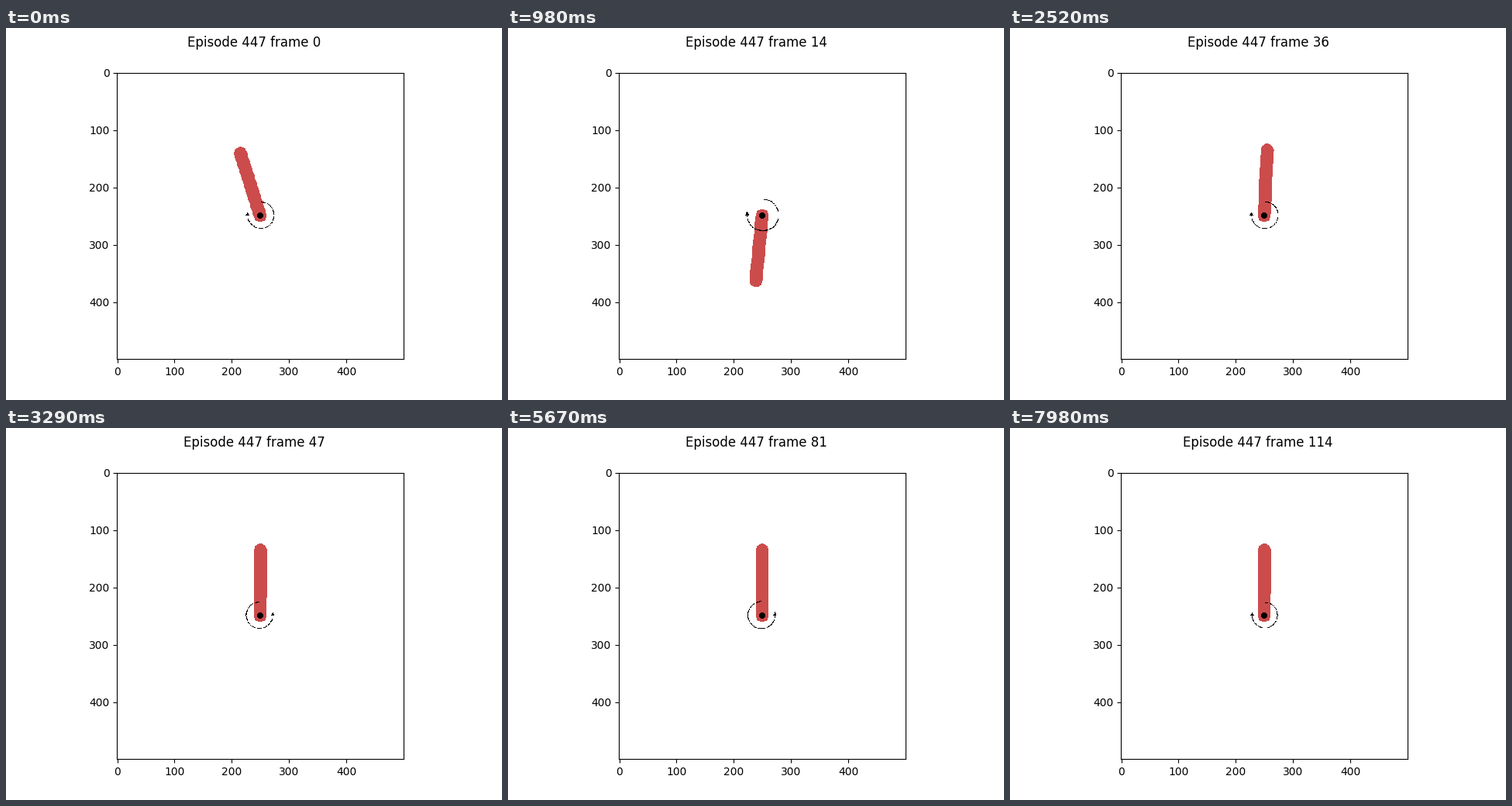
A matplotlib script for the animation above (8 s loop, 640 px wide and 480 px high).

```python
import numpy as np
import matplotlib.pyplot as plt
from matplotlib.animation import FuncAnimation

plt.rcParams["font.family"] = "DejaVu Sans"

LOOP_MS, TICK_MS, STEP_MS = 8000, 20, 70
SIZE = 500
UNIT = SIZE / 4.4                 # pixels per metre in the simulated view
ROD_LENGTH, ROD_RADIUS, AXLE_RADIUS = UNIT, 0.1 * UNIT, 0.05 * UNIT
SCREEN_SCALE = 0.74               # screen pixels per view pixel
RED, BLACK = (204, 76, 76, 255), (0, 0, 0, 255)
SETTLED = 26                      # step at which the balancing chatter begins

# Phase along the pendulum's separatrix, nearly linear in time.
PHASE_STEPS = [0, 6, 12, 14, 26, 47, 114]
PHASE = [-2.565, -1.585, -0.460, -0.048, 2.359, 6.96, 20]

# Radius of the torque arrow on screen; positive is counter-clockwise.
SWING_STEPS = [0, 5, 10, 14, 22, 26]
SWING_TORQUE = [-17, 15, 15, -20.3, -14, 0]
HOLD_STEPS = [27, 47, 66, 70, 93, 97, 114]
HOLD_TORQUE = [17.3, 17, 14.5, 17.3, 17.5, 15.7, 16.3]

rows, cols = np.mgrid[:SIZE, :SIZE]
dx = cols + 0.5 - SIZE / 2
dy = rows + 0.5 - SIZE / 2
axle = np.hypot(dx, dy) <= AXLE_RADIUS


def rod_angle(step):
    """Angle from straight down, positive to the right."""
    angle = 2 * np.arctan(np.sinh(np.interp(step, PHASE_STEPS, PHASE)))
    if step > SETTLED:
        angle -= 0.0006 if step % 2 else 0.0036
    return angle


def torque_radius(step):
    if step <= SETTLED:
        return np.interp(step, SWING_STEPS, SWING_TORQUE)
    sign = 1 if step % 2 else -1
    return sign * np.interp(step, HOLD_STEPS, HOLD_TORQUE)


def rod_mask(angle):
    along = dx * np.sin(angle) + dy * np.cos(angle)
    across = dx * np.cos(angle) - dy * np.sin(angle)
    beyond = along - np.clip(along, 0, ROD_LENGTH)
    return np.hypot(across, beyond) <= ROD_RADIUS


def arrow_mask(torque):
    """Three quarters of a circle from the top, ending in an arrowhead."""
    radius = abs(torque) / SCREEN_SCALE
    x = -np.sign(torque) * dx / radius - 0.05
    y = dy / radius + 0.03
    arc = (np.abs(np.hypot(x, y) - 1) <= 0.025) & ((x >= 0) | (y >= 0))
    head = (y <= 0.02) & (np.abs(x + 1) <= 0.45 * (y + 0.27))
    return arc | head


def render(step):
    view = np.full((SIZE, SIZE, 4), 255, np.uint8)
    view[rod_mask(rod_angle(step))] = RED
    view[axle] = BLACK
    torque = torque_radius(step)
    if abs(torque) > 1:
        view[arrow_mask(torque)] = BLACK
    return view


fig, ax = plt.subplots(figsize=(6.4, 4.8), dpi=100)
image = ax.imshow(render(0), interpolation="nearest")
title = fig.suptitle("Episode 447 frame 0")
shown = {"step": 0}


def update(tick):
    step = (tick * TICK_MS + TICK_MS // 2) // STEP_MS
    if step != shown["step"]:
        shown["step"] = step
        image.set_data(render(step))
        title.set_text(f"Episode 447 frame {step}")
    return image, title


anim = FuncAnimation(fig, update, frames=LOOP_MS // TICK_MS, interval=TICK_MS,
                     repeat=True, repeat_delay=0, blit=False)
plt.show()
```
